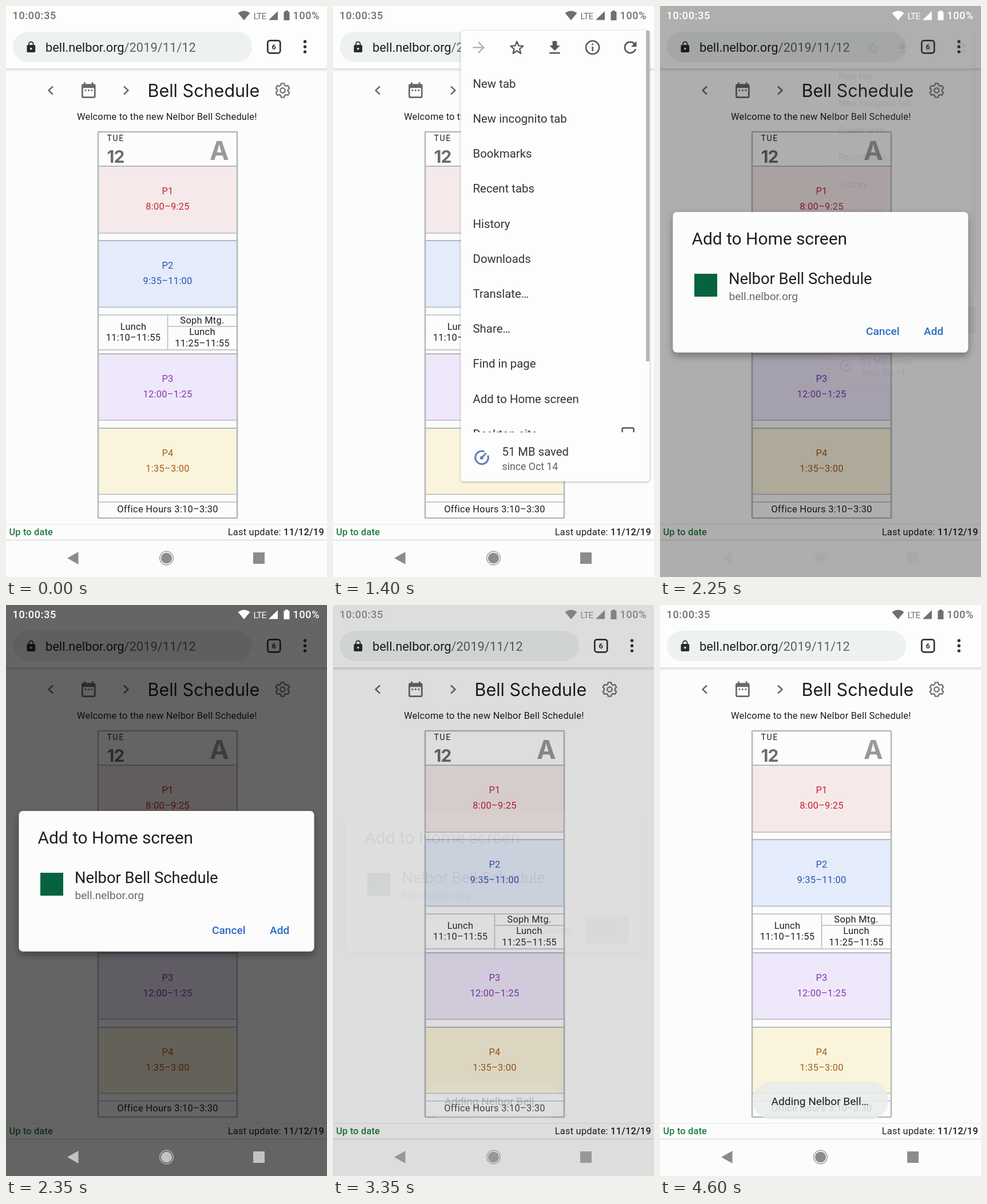
An HTML page that plays this animation: 561x998 px, repeating every 5 s.

```html
<!DOCTYPE html>
<html lang="en">
<head>
<meta charset="utf-8">
<title>Bell Schedule</title>
<style>
  html, body { margin: 0; width: 100%; height: 100%; overflow: hidden; background: #fcfcfc; }
  svg { display: block; width: 100%; height: 100%; }
  text { font-family: Roboto, sans-serif; white-space: pre; }
  .geo { font-family: Inter, sans-serif; }
</style>
</head>
<body>
<svg id="stage" viewBox="0 0 561 998"></svg>
<script>
const LOOP = 5000;
const stage = document.getElementById('stage');

// Markup helpers
const text = (x, y, size, fill, str, extra = '') =>
  `<text x="${x}" y="${y}" font-size="${size}" fill="${fill}" ${extra}>${str}</text>`;
const rect = (x, y, w, h, fill, extra = '') =>
  `<rect x="${x}" y="${y}" width="${w}" height="${h}" fill="${fill}" ${extra}/>`;
const line = (x1, y1, x2, y2, stroke, w) =>
  `<path d="M${x1} ${y1}L${x2} ${y2}" stroke="${stroke}" stroke-width="${w}"/>`;
const stroked = (d, color, w) =>
  `<path d="${d}" fill="none" stroke="${color}" stroke-width="${w}" stroke-linejoin="round"/>`;
const icon = (cx, cy, scale, fill, d) =>
  `<path transform="translate(${cx} ${cy}) scale(${scale}) translate(-12 -12)" fill="${fill}" d="${d}"/>`;
const group = (id, content, extra = '') => `<g id="${id}" ${extra}>${content}</g>`;
const polar = (cx, cy, points) => 'M' + points.map(([deg, r]) => {
  const a = deg * Math.PI / 180;
  return `${(cx + r * Math.cos(a)).toFixed(2)} ${(cy + r * Math.sin(a)).toFixed(2)}`;
}).join('L') + 'Z';

const INK = '#1d1f1e', GREY = '#666967', RULE = '#b3babb';
const MIDDLE = 'text-anchor="middle" letter-spacing=".3"';
const MEDIUM = 'font-weight="500"';
const label = (x, y, str, fill = INK) => text(x, y, 16.4, fill, str, MIDDLE);

function browserBar() {
  const lock = 'M18 8h-1V6c0-2.76-2.24-5-5-5S7 3.24 7 6v2H6c-1.1 0-2 .9-2 2v10c0 1.1.9 2 2 2h12c1.1 0 2-.9 2-2V10c0-1.1-.9-2-2-2z' +
    'm-6 9c-1.1 0-2-.9-2-2s.9-2 2-2 2 .9 2 2-.9 2-2 2zm3.1-9H8.9V6c0-1.71 1.39-3.1 3.1-3.1s3.1 1.39 3.1 3.1v2z';
  return rect(0, 108, 561, 7, 'url(#barShadow)') + rect(0, 0, 561, 109, '#fcfdfc') +
    rect(12, 45, 418, 53, '#edf1ef', 'rx="26.5"') +
    icon(43.8, 71.8, .92, '#2a2c2b', lock) +
    text(69, 79.6, 21.84, INK, 'bell.nelbor.org<tspan fill="#5f6361">/2019/11/12</tspan>') +
    rect(457.3, 60.3, 22, 22, 'none', 'rx="4" stroke="#333" stroke-width="2.7"') +
    text(468.3, 76, 13, '#333', '6', 'text-anchor="middle" font-weight="700"') +
    [62.3, 71.2, 80.1].map(y => `<circle cx="522.5" cy="${y}" r="2.7" fill="#333"/>`).join('');
}

function pageHeader() {
  const calendar = 'M9 11H7v2h2v-2zm4 0h-2v2h2v-2zm4 0h-2v2h2v-2zm2-7h-1V2h-2v2H8V2H6v2H5c-1.11 0-1.99.9-1.99 2L3 20' +
    'c0 1.1.89 2 2 2h14c1.1 0 2-.9 2-2V6c0-1.1-.9-2-2-2zm0 16H5V9h14v11z';
  const teeth = [];
  for (let a = 30; a < 390; a += 60) teeth.push([a - 23, 9.4], [a - 12, 12.4], [a + 12, 12.4], [a + 23, 9.4]);
  return stroked('M82 140.5L74.5 147.5L82 154.5', GREY, 2.4) +
    stroked('M206 140.5L213.5 147.5L206 154.5', GREY, 2.4) +
    icon(144.3, 147.3, 1.37, GREY, calendar) +
    stroked(polar(483.5, 147.5, teeth), '#757876', 2.4) +
    '<circle cx="483.5" cy="147.5" r="4.2" fill="none" stroke="#757876" stroke-width="2.4"/>' +
    text(247.5, 159, 30.5, INK, 'Bell Schedule', 'class="geo"') +
    text(124, 199, 16.4, INK, 'Welcome to the new Nelbor Bell Schedule!', 'letter-spacing=".2"');
}

function schedule() {
  const periods = [
    ['P1', '8:00–9:25', 280, 397, '#f6e9e9', '#bf2434'],
    ['P2', '9:35–11:00', 410, 526.5, '#e4ebfa', '#2753b3'],
    ['P3', '12:00–1:25', 608, 724, '#efe7fa', '#8238b0'],
    ['P4', '1:35–3:00', 738, 853.5, '#fbf4dc', '#a85c18'],
  ];
  const blocks = periods.map(([name, time, top, bottom, fill, ink]) =>
    rect(162, top, 241, bottom - top, fill) +
    line(162, top, 403, top, RULE, 2) + line(162, bottom, 403, bottom, RULE, 1.6) +
    label(282.5, top + 48.8 - (top === 280 ? 0 : .2), name, ink) +
    label(282.5, top + 75.8, time, ink)).join('');
  return text(176.5, 236, 14, INK, 'TUE', 'letter-spacing="1.7"') +
    text(176.5, 273.5, 30, '#6b6d6c', '12', 'class="geo" font-weight="700" letter-spacing="-1"') +
    text(372.8, 269, 45, '#989a99', 'A', 'class="geo" font-weight="700" text-anchor="middle"') +
    blocks +
    [540, 601, 867].map(y => line(162, y, 403, y, RULE, 1.5)).join('') +
    line(282.5, 540, 282.5, 601, RULE, 1.5) + line(282.5, 560, 403, 560, RULE, 1.5) +
    label(222.5, 565.5, 'Lunch') + label(222.5, 584.7, '11:10–11:55') +
    label(343, 554.5, 'Soph Mtg.') + label(343, 575.3, 'Lunch') + label(343, 594.7, '11:25–11:55') +
    label(282.5, 885, 'Office Hours 3:10–3:30') +
    rect(161, 220, 243, 675, 'none', `rx="1" stroke="${RULE}" stroke-width="2.6"`);
}

function footer() {
  return line(0, 906, 561, 906, '#ececec', 1.5) + line(0, 933.5, 561, 933.5, '#dadcda', 1.5) +
    text(5.5, 925.3, 16.4, '#1f7a41', 'Up to date', MEDIUM + ' letter-spacing=".15"') +
    text(556, 925.3, 16.4, INK, `Last update: <tspan ${MEDIUM}>11/12/19</tspan>`, 'text-anchor="end" letter-spacing=".25"');
}

const statusIcons =
  text(11.5, 23.3, 18, 'inherit', '10:00:35', MEDIUM + ' letter-spacing=".7"').replace('fill="inherit"', '') +
  '<path d="M416 25L405.5 12.3Q416 4.500 426.500 12.300ZM459 24.500L475 9V24.500Z"/>' +
  '<path d="M488 8h5v2h2.500v15h-10v-15h2.500z"/>' +
  '<text x="432.500" y="22.500" font-size="15.500" letter-spacing="-.8">LTE</text>' +
  '<text x="501.500" y="23.300" font-size="18" font-weight="500" letter-spacing=".7">100%</text>';

const navIcons = '<path d="M107 965L126.500 954V976ZM432 955h20v20h-20z"/>' +
  '<circle cx="280.500" cy="965" r="9.600"/>' +
  '<circle cx="280.500" cy="965" r="11.800" fill="none" class="ring" stroke-width="1.300"/>';

const MENU = ['New tab', 'New incognito tab', 'Bookmarks', 'Recent tabs', 'History', 'Downloads',
  'Translate…', 'Share…', 'Find in page', 'Add to Home screen', 'Desktop site'];

function menu() {
  const star = Array.from({ length: 10 }, (_, i) => [i * 36 - 90, i % 2 ? 5 : 11.5]);
  const dark = '#555856';
  const icons = [
    icon(254.8, 72.5, 1.3, '#b5b7b5', 'M12 4l-1.41 1.41L16.17 11H4v2h12.17l-5.58 5.59L12 20l8-8z'),
    stroked(polar(321.4, 73.5, star), dark, 2.3),
    icon(387.5, 73, 1.3, dark, 'M19 9h-4V3H9v6H5l7 7 7-7zM5 18v2h14v-2H5z'),
    stroked('M442 72.500a11.600 11.600 0 1 0 23.200 0a11.600 11.600 0 1 0 -23.200 0M453.600 71v8M453.600 65.500v2.700', dark, 2.5),
    icon(519.5, 72.5, 1.36, dark, 'M17.65 6.35C16.2 4.9 14.21 4 12 4c-4.42 0-7.99 3.58-7.99 8s3.57 8 7.99 8c3.73 0 6.84-2.55 7.73-6h-2.08' +
      'c-.82 2.33-3.04 4-5.65 4-3.31 0-6-2.69-6-6s2.69-6 6-6c1.66 0 3.14.69 4.22 1.78L13 11h7V4l-2.35 2.35z'),
  ];
  const items = MENU.map((name, i) => {
    const y = 135.5 + 61.2 * i;
    const box = i === 10 ? rect(505.5, y - 10, 20, 20, 'none', `rx="2" stroke="${dark}" stroke-width="2.500"`) : '';
    return `<g class="item">${text(244.5, y + 7.2, 20.4, '#333635', name)}${box}</g>`;
  });
  return rect(223.5, 43, 329.5, 788, '#fcfdfc', 'rx="5" filter="url(#softShadow)"') +
    rect(223.5, 655, 329.5, 61, '#000', 'id="rowTap"') +
    icons.map(markup => `<g class="icon">${markup}</g>`).join('') +
    `<g clip-path="url(#menuClip)">${items.join('')}</g>` +
    rect(547, 43, 6, 578, '#b4b7b5') +
    stroked('M264.500 778.900A11.300 11.300 0 1 0 270.700 785.500M259.500 790L267.500 781.500', '#6580b8', 3.2) +
    '<circle cx="259.800" cy="789.800" r="3" fill="#6580b8"/>' +
    text(295.5, 785.5, 20.3, '#333635', '51 MB saved') +
    text(295.5, 811, 17.7, '#5f6261', 'since Oct 14');
}

function dialog() {
  return rect(22.5, 360, 516, 245.5, '#fbfcfb', 'rx="7" filter="url(#deepShadow)"') +
    text(55.5, 416.8, 29.9, INK, 'Add to Home screen') +
    rect(60, 468, 40, 40, '#06633f') +
    text(120, 485.5, 27.3, INK, 'Nelbor Bell Schedule') +
    text(120.5, 514, 19.1, GREY, 'bell.nelbor.org') +
    rect(440, 542, 77, 50, '#000', 'id="addTap" rx="3"') +
    text(360, 574.8, 19.1, '#2a6cc6', 'Cancel', MEDIUM) + text(461, 574.8, 19.1, '#2a6cc6', 'Add', MEDIUM);
}

stage.innerHTML = `<defs>
  <linearGradient id="barShadow" x2="0" y2="1"><stop stop-color="#d4d6d5"/><stop offset="1" stop-color="#fcfcfc"/></linearGradient>
  <filter id="softShadow"><feDropShadow dx="0" dy="1" stdDeviation="2" flood-opacity=".3"/></filter>
  <filter id="deepShadow" y="-20%" height="150%"><feDropShadow dx="0" dy="6" stdDeviation="7" flood-opacity=".35"/></filter>
  <clipPath id="menuClip"><rect x="223" y="100" width="330" height="645"/></clipPath>
</defs>` +
  rect(0, 0, 561, 998, '#fcfcfc') + browserBar() + pageHeader() + schedule() + footer() +
  rect(497, 33, 64, 76, '#000', 'id="menuTap"') +
  group('menu', menu()) +
  rect(0, 0, 561, 998, '#000', 'id="dim"') +
  group('status', statusIcons) + group('nav', navIcons) +
  group('dialog', dialog()) +
  group('toast', rect(162, 833, 237, 66, '#e9ecea', 'rx="33" fill-opacity=".88"') +
    text(194.5, 874, 19.1, INK, 'Adding Nelbor Bell…'));

const $ = id => document.getElementById(id);
const icons = document.querySelectorAll('.icon');
const items = document.querySelectorAll('.item');
const ring = document.querySelector('.ring');

// Timing helpers
const ramp = (t, from, to) => Math.min(1, Math.max(0, (t - from) / (to - from)));
const easeOut = p => 1 - (1 - p) ** 2;
function fastOutSlowIn(x) {
  let lo = 0, hi = 1;
  for (let i = 0; i < 20; i++) {
    const s = (lo + hi) / 2, r = 1 - s;
    if (1.2 * s * r * r + .6 * s * s * r + s ** 3 < x) lo = s; else hi = s;
  }
  return lo * lo * (3 - 2 * lo);
}
const grey = v => `rgb(${v},${v},${v})`;
function fade(el, opacity) {
  el.setAttribute('opacity', opacity);
  el.setAttribute('visibility', opacity > 0 ? 'visible' : 'hidden');
}
function enter(el, t, start, dx, dy) {
  const p = fastOutSlowIn(ramp(t, start, start + 350));
  el.setAttribute('opacity', p);
  el.setAttribute('transform', `translate(${dx * (1 - p)} ${dy * (1 - p)})`);
}

function draw(t) {
  fade($('menuTap'), .39 * ramp(t, 540, 680) * (1 - ramp(t, 900, 1050)));

  const scale = 1 - .15 * (1 - easeOut(ramp(t, 690, 850))) - .227 * easeOut(ramp(t, 2070, 2270));
  fade($('menu'), ramp(t, 690, 885) * (1 - ramp(t, 2070, 2270)));
  $('menu').setAttribute('transform', `translate(546 77) scale(${scale}) translate(-546 -77)`);
  icons.forEach((el, i) => enter(el, t, 690 + 30 * i, 13.65, 0));
  items.forEach((el, i) => enter(el, t, 720 + 30 * i, 0, -13.65));
  fade($('rowTap'), .42 * ramp(t, 1840, 1960));

  const dim = .6 * ramp(t, 2145, 2350) * (1 - ramp(t, 3232, 3382));
  fade($('dim'), dim);
  const light = ramp(t, 2050, 2250) * (1 - ramp(t, 3220, 3370));
  $('status').setAttribute('fill', grey(112 + 143 * light));
  const navColor = grey(140 + 55 * dim / .6);
  $('nav').setAttribute('fill', navColor);
  ring.setAttribute('stroke', navColor);

  fade($('dialog'), ramp(t, 2070, 2150) * (1 - ramp(t, 3228, 3358)));
  $('dialog').setAttribute('transform', `translate(0 ${40 * (1 - ramp(t, 2070, 2230)) ** 2})`);
  fade($('addTap'), .34 * ramp(t, 2890, 3010));

  fade($('toast'), ramp(t, 3310, 3500));
}

function tick() {
  draw(performance.now() % LOOP);
  requestAnimationFrame(tick);
}
tick();
</script>
</body>
</html>
```
